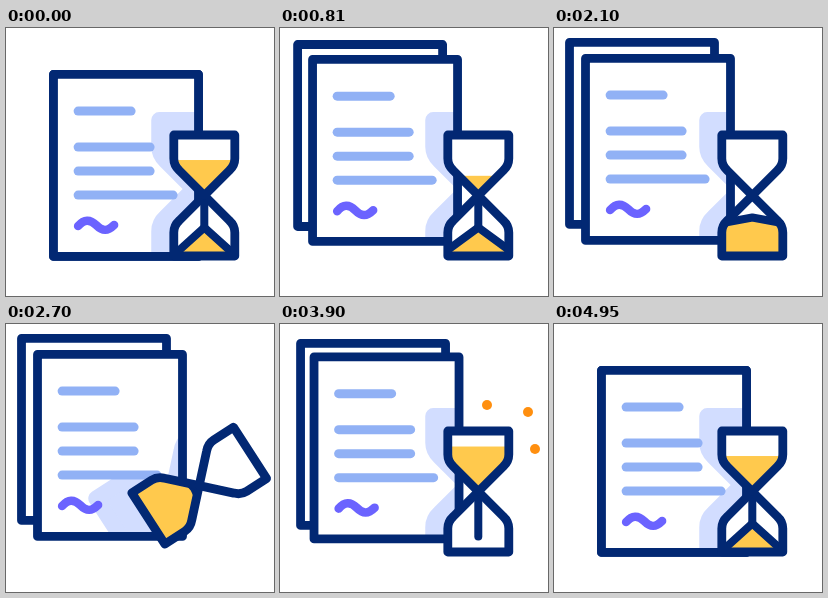
An HTML page with a canvas for the animation above (5.43 s loop, 268x268 px).

```html
<!DOCTYPE html>
<html lang="en">
<head>
<meta charset="utf-8">
<title>Document and hourglass</title>
<style>
  html, body { margin: 0; height: 100%; overflow: hidden; background: #fff; }
  canvas { display: block; width: 268px; height: 268px; }
</style>
</head>
<body>
<canvas></canvas>
<script>
const LOOP = 5430;
const NAVY = '#022873', SAND = '#ffc94d', LINE = '#91b1f5', INK = '#6b63ff',
      SHADE = '#d2ddff', SPARK = '#ff8f0f';

const canvas = document.querySelector('canvas');
const c = canvas.getContext('2d');
const dpr = window.devicePixelRatio || 1;
canvas.width = canvas.height = 268 * dpr;

const mix = (a, b, k) => a + (b - a) * k;
const ramp = (t, from, to) => Math.min(1, Math.max(0, (t - from) / (to - from)));
const smooth = (t, from, to) => { const k = ramp(t, from, to); return k * k * (3 - 2 * k); };

// Lower chamber, waist at the origin
const chamber = new Path2D('M-30.5 60.5V37Q-30.5 30 -25 25L0 0L25 25Q30.5 30 30.5 37V60.5Z');
const squiggle = new Path2D('M25 152C31 145 37 145 43 151S54 158 61 151');
const textLines = [[37, 78], [73, 97], [97, 97], [121, 120]];
const sparks = [[207, 81], [248, 88], [255, 125]];

function stroke(color, width, path) {
  c.strokeStyle = color;
  c.lineWidth = width;
  path ? c.stroke(path) : c.stroke();
}

function placed(x, y, angle, draw) {
  c.save();
  c.translate(x, y);
  c.rotate(angle);
  draw();
  c.restore();
}

function bothChambers(draw) {
  for (const side of [1, -1]) {
    c.save();
    c.scale(1, side);
    draw(side);
    c.restore();
  }
}

function polygon(points) {
  c.beginPath();
  for (const [x, y] of points) c.lineTo(x, y);
}

function page(x, y) {
  c.beginPath();
  c.rect(x, y, 145, 182);
  c.fillStyle = '#fff';
  c.fill();
}

function drawPages(t) {
  const out = 16 * (smooth(t, 305, 905) - smooth(t, 3750, 4350));
  page(47.5 - 2 * out, 46.4 - 2 * out);
  stroke(NAVY, 8.8);

  const x = 47.5 - out, y = 46.4 - out;
  page(x, y);
  c.save();
  c.clip();
  drawShadow(t);
  c.restore();

  placed(x - 0.4, y - 0.3, 0, () => {
    for (const [top, end] of textLines) {
      c.beginPath();
      c.moveTo(25, top);
      c.lineTo(end, top);
      stroke(LINE, 9);
    }
    stroke(INK, 8.5, squiggle);
  });
  c.beginPath();
  c.rect(x, y, 145, 182);
  stroke(NAVY, 8.8);
}

const turn = t => t < 3600 ? Math.PI * smooth(t, 2250, 3450) : 0;

function drawShadow(t) {
  const u = ramp(t, 2250, 3300);
  const dx = -22 * Math.sin(Math.PI * u) ** 2;
  const dy = 6 * Math.sin(2 * Math.PI * u ** 1.3);
  placed(188 + dx, 161 + dy, turn(t), () => {
    c.scale(1.14, 1.14);
    c.fillStyle = SHADE;
    bothChambers(() => { c.fill(chamber); stroke(SHADE, 14, chamber); });
  });
}

function drawSparks(t) {
  const k = 1 - (1 - ramp(t, 3075, 3575)) ** 3;
  const radius = 5 * ramp(t, 3075, 3215) * (1 - ramp(t, 3950, 4150));
  if (!radius) return;
  c.fillStyle = SPARK;
  for (const [x, y] of sparks) {
    c.beginPath();
    c.arc(mix(207, x, k), mix(128, y, k), radius, 0, 7);
    c.fill();
  }
}

// Sand lying in the lower chamber: a peaked heap with a navy crest
function drawHeap(peak, edge, far) {
  const crest = [[-31, edge], [0, peak], [31, edge]];
  polygon([...crest, [31, far], [-31, far]]);
  c.fillStyle = SAND;
  c.fill();
  polygon(crest);
  stroke(NAVY, 8);
}

function drawLowerSand(t, flow) {
  if (t >= 2250 && t < 3600) {
    const s = ramp(t, 2250, 3450);
    const near = ramp(s, 0, 0.6);
    drawHeap(mix(22, -4, near), mix(27, 0, near), mix(61, 45, ramp(s, 0.6, 1)));
    return;
  }
  const early = mix(66, 32, ramp(flow, 300, 1200));
  const peak = flow < 1200 ? early : mix(32, 22, smooth(flow, 1650, 2950));
  const edge = flow < 1200 ? early + 28 : mix(60, 27, ramp(flow, 1200, 3000) ** 1.4);
  drawHeap(peak, edge, 70);

  const start = 40 * ramp(flow, 2260, 2500);
  const end = Math.min(peak, 45 * ramp(flow, 0, 150));
  if (end > start) {
    polygon([[0, start], [0, end]]);
    stroke(NAVY, 8);
  }
}

function drawUpperSand(flow) {
  const level = 45 * (1 - ramp(flow, 0, 2050) ** 2.9);
  c.fillStyle = SAND;
  c.fillRect(-31, 0, 62, level);
}

function drawHourglass(t) {
  // Running time of the sand, paused while the picture rests
  const flow = t >= 3600 ? Math.max(0, Math.min(t, 4950) - 3750) : Math.max(0, t - 330) + 1200;
  const hop = Math.sin(Math.PI * ramp(t, 2250, 3450)) ** 4;
  placed(198.3 - 7 * hop, 167.5 - 8 * hop, turn(t), () => {
    bothChambers(side => {
      c.fillStyle = '#fff';
      c.fill(chamber);
      c.save();
      c.clip(chamber);
      side > 0 ? drawLowerSand(t, flow) : drawUpperSand(flow);
      c.restore();
    });
    bothChambers(() => stroke(NAVY, 8.8, chamber));
  });
}

function frame(now) {
  const t = now % LOOP;
  c.setTransform(dpr, 0, 0, dpr, 0, 0);
  c.fillStyle = '#fff';
  c.fillRect(0, 0, 268, 268);
  c.lineCap = c.lineJoin = 'round';
  drawPages(t);
  drawSparks(t);
  drawHourglass(t);
}

const begin = performance.now();
(function tick() {
  frame(performance.now() - begin);
  requestAnimationFrame(tick);
})();
</script>
</body>
</html>
```
